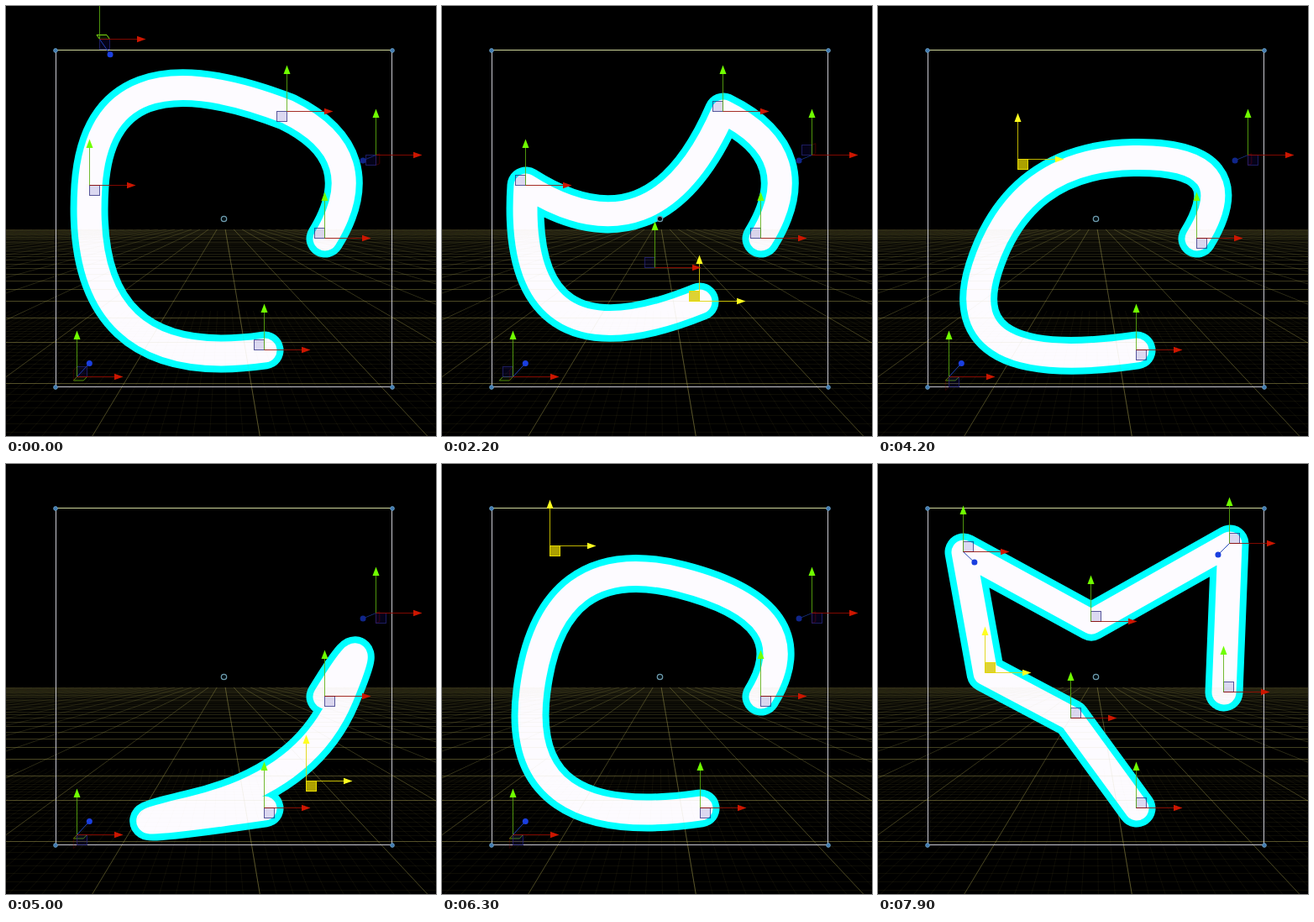
An HTML page for the animation above (8 s loop, 512 by 512 pixels).

```html
<!DOCTYPE html>
<html lang="en">
<head>
<meta charset="utf-8">
<title>Spline editor</title>
<style>
  html, body { margin: 0; width: 100%; height: 100%; overflow: hidden; background: #000; }
  svg { display: block; width: 100vw; height: 100vh; }
</style>
</head>
<body>
<svg viewBox="0 0 512 512">
  <g id="grid" fill="none" stroke="#a39c50"></g>
  <g fill="none" stroke-linecap="round" stroke-linejoin="round">
    <path id="rim" stroke="#00ffff" stroke-width="45"/>
    <path id="core" stroke="#fdfbff" stroke-width="29"/>
  </g>
  <use href="#grid" opacity=".2"/>
  <g id="frame" fill="none"></g>
  <g id="gizmos"></g>
</svg>
<script>
const LOOP = 8000, STEP = 100;
const CENTER = [259.5, 253.5];
const $ = id => document.getElementById(id);
const clamp = v => Math.max(0, Math.min(1, v));

// Floor in perspective: depth rows and lines running to the vanishing point
function buildGrid() {
  const [vx, vy] = [259, 253], far = 266, rowStep = 0.00167;
  const path = (d, alpha) => `<path d="${d}" stroke-opacity="${alpha.toFixed(3)}"/>`;
  const row = n => vy + 1 / (0.0051 + rowStep * n);
  const ray = (n, top) => {
    const k = 0.167 + 0.77 * n;
    return `M${vx + k * (top - vy)} ${top}L${vx + k * 262} 515`;
  };
  let out = '';
  for (let n = -1; n < 43; n++) {
    const y = row(n), gap = rowStep * (y - vy) ** 2;
    if (y > far && y < 512) {
      out += path(`M0 ${Math.floor(y) + 0.5}H512`, 0.42 * Math.min(1, Math.sqrt(gap / 16)));
    }
  }
  for (let n = -26; n <= 26; n++) out += path(ray(n, far), 0.45 / (1 + 0.3 * Math.abs(n)));
  let fine = '';
  for (let i = -10; i < 20; i++) fine += `M0 ${Math.floor(row(i / 10)) + 0.5}H512`;
  for (let i = -40; i < 40; i++) fine += ray(i / 10, vy + 110);
  $('grid').innerHTML = out + path(fine, 0.07);
}

function buildFrame() {
  const dots = [[59, 53], [460, 53], [59, 454], [460, 454]]
    .map(([x, y]) => `<circle cx="${x}" cy="${y}" r="2.4" fill="#3f78b0" stroke="#6ea2c4" stroke-width=".8"/>`);
  $('frame').innerHTML =
    '<path d="M59.5 53.5V453.5H459.5V53.5" stroke="#c9c9d2"/>' +
    '<path d="M59 52.5H460" stroke="#cfd69a"/>' + dots.join('') +
    `<circle cx="${CENTER[0]}" cy="${CENTER[1]}" r="3.2" fill="#041014" stroke="#6f9db0" stroke-width="1.2"/>`;
}

// Smooth path through [time, x, y] keys, at rest at both ends
function track(keys, t) {
  const last = keys.length - 1;
  if (t <= keys[0][0]) return keys[0].slice(1);
  if (t >= keys[last][0]) return keys[last].slice(1);
  const i = keys.findIndex(k => k[0] > t) - 1;
  const a = keys[i], b = keys[i + 1], span = b[0] - a[0], u = (t - a[0]) / span;
  const slope = (j, c) => j === 0 || j === last ? 0 :
    (keys[j + 1][c] - keys[j - 1][c]) / (keys[j + 1][0] - keys[j - 1][0]);
  return [1, 2].map(c =>
    a[c] + (b[c] - a[c]) * u * u * (3 - 2 * u) +
    span * u * (1 - u) * ((1 - u) * slope(i, c) - u * slope(i + 1, c)));
}

const HEAD = [308, 410], LOW = [85, 442], HIGH = [112, 40], SIDE = [441, 178], TAIL = [380, 277];
const BEND = [[300, ...HIGH], [1100, 182, 180], [1800, 254, 312]];
const LIFT = [[1900, ...HEAD], [2200, 307, 352], [2500, 306, 305], [2800, 308, 345]];
const SWEEP = [[3700, ...HIGH], [4200, 167, 183], [4500, 228, 280], [5000, 358, 378],
  [5200, 374, 408], [5400, 318, 365], [5900, 180, 200], [6300, 129, 98]];
const ELBOW = [[6400, ...LOW], [6600, 62, 455], [7300, 88, 385], [7900, 128, 249]];

const mid = (a, b) => [(a[0] + b[0]) / 2, (a[1] + b[1]) / 2];
const at = p => p.map(v => v.toFixed(2)).join(' ');
const quads = p => `M${at(p[0])}` +
  [1, 3, 5].map(i => `Q${at(p[i])} ${at(p[i + 1])}`).join('');

// Points, outline, grabbed point and the side its handles face
function scene(t) {
  if (t < 2900) {
    const pts = [track(LIFT, t), LOW, [100, 214], track(BEND, t), [335, 126], SIDE, TAIL];
    const active = t < 300 ? -1 : t < 1900 ? 3 : 0;
    return { pts, d: quads(pts), active, face: active ? [1, 1] : [-1, -1] };
  }
  if (t < 6400) {
    const c = track(SWEEP, t);
    const d = quads([HEAD, LOW, mid(LOW, c), c, mid(c, SIDE), SIDE, TAIL]);
    return { pts: [HEAD, LOW, c, SIDE, TAIL], d, active: t < 3700 ? -1 : 2, face: [1, 1] };
  }
  const pts = [HEAD, [230, 303], track(ELBOW, t), [102, 105], [254, 188], [419, 95], [412, 272]];
  return { pts, d: 'M' + pts.map(at).join('L'), active: 2, face: [1, -1] };
}

function gizmo([x, y], active, face) {
  const toCenter = [CENTER[0] - x, CENTER[1] - y];
  const [sx, sy] = face || toCenter.map(v => v < 0 ? -1 : 1);
  const [zx, zy] = toCenter.map(v => v * 0.085);
  const tint = (hot, cold) => active ? hot : cold;
  const line = (d, color, alpha = 1) =>
    `<path d="${d}" fill="none" stroke="${color}" stroke-opacity="${alpha}"/>`;
  const plane = (ax, ay, bx, by, color, alpha) => alpha <= 0 ? '' :
    `<path d="M0 0l${ax} ${ay}l${bx} ${by}l${-ax} ${-ay}z" fill="${color}" fill-opacity=".1" ` +
    `stroke="${color}" opacity="${alpha}"/>`;
  const thick = v => clamp((Math.abs(v) - 13.5) / 4);
  const depth = clamp((Math.hypot(zx, zy) - 14) / 4.4);

  // Half-pixel origin keeps the axis lines crisp
  let out = `<g transform="translate(${Math.round(x) - 0.5} ${Math.round(y) - 0.5})">`;
  out += plane(12 * sx, 0, -zx * 0.28, -zy * 0.28, '#7fe010', thick(zy));
  out += plane(0, 12 * sy, -zx * 0.28, -zy * 0.28, '#a00000', thick(zx) * 0.8);
  if (depth > 0 && !active) {
    out += `<g opacity="${depth}">` + line(`M0 0L${zx} ${zy}`, '#2347b8') +
      `<circle cx="${zx}" cy="${zy}" r="3.5" fill="#1a3fe0"/></g>`;
  }
  out += `<rect x="${sx * 6 - 6}" y="${sy * 6 - 6}" width="12" height="12" ` +
    (active ? 'fill="#d8c800" fill-opacity=".8" stroke="#e8dc00"/>'
            : 'fill="#1c10a0" fill-opacity=".15" stroke="#26267c" stroke-opacity=".75"/>');
  out += line('M0 0V-45', tint('#e0d400', '#5cae10'), 0.85);
  out += line('M0 0H45', tint('#e0d400', '#960a00'), 0.85);
  out += `<path d="M0 -55L4 -44.5H-4z" fill="${tint('#ffff20', '#70ff00')}"/>`;
  out += `<path d="M55 0L44.5 3.7V-3.7z" fill="${tint('#ffff20', '#cc1600')}"/>`;
  return out + '</g>';
}

function draw(t) {
  const { pts, d, active, face } = scene(t);
  $('rim').setAttribute('d', d);
  $('core').setAttribute('d', d);
  $('gizmos').innerHTML =
    pts.map((p, i) => gizmo(p, i === active, active < 0 ? null : face)).join('');
}

function tick() {
  draw(Math.floor(performance.now() % LOOP / STEP) * STEP);
  requestAnimationFrame(tick);
}

buildGrid();
buildFrame();
tick();
</script>
</body>
</html>
```
